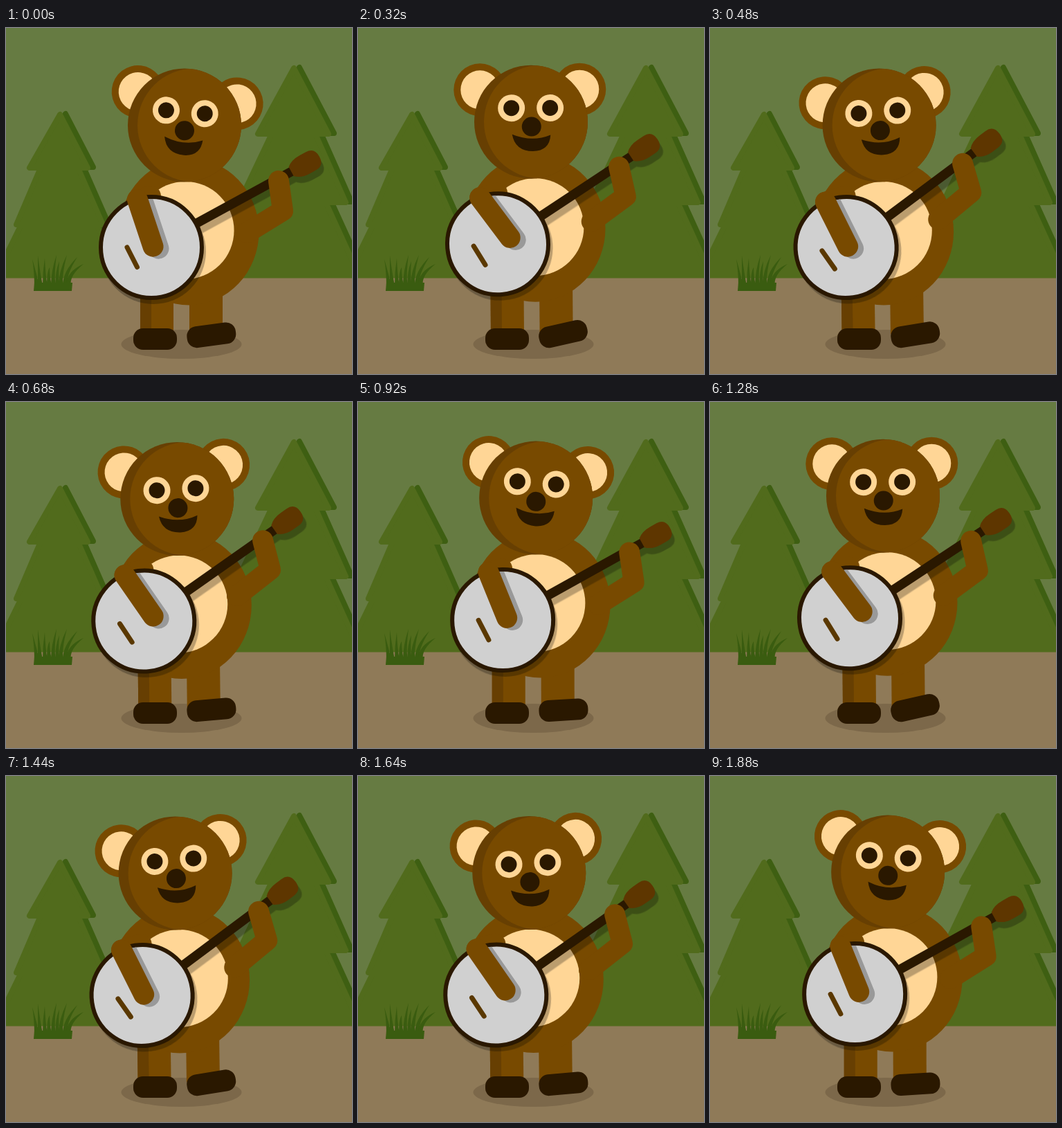
An HTML page that plays this animation: 500x500 px, repeating every 1920 ms.

```html
<!DOCTYPE html>
<html lang="en">
<head>
<meta charset="utf-8">
<title>Banjo bear</title>
<style>
  html, body { margin: 0; width: 100%; height: 100%; overflow: hidden; background: #667b42; }
  svg { display: block; width: 100vw; height: 100vh; }
  .fur { fill: #784a00; }
  .shade { fill: #673f02; }
  .cream { fill: #ffd696; }
  .dark { fill: #2a1800; }
  .limb { fill: none; stroke: #784a00; stroke-width: 30; stroke-linecap: round; stroke-linejoin: round; }
  .leg { fill: none; stroke: #784a00; stroke-width: 48; }
  .tree { fill: #516b1c; stroke: #516b1c; stroke-width: 8; stroke-linejoin: round; }
  .tree.back { fill: #3e5f12; stroke: #3e5f12; }
  .grass { fill: #3a5c10; }
  .cast { opacity: .27; }
</style>
</head>
<body>
<svg viewBox="0 0 500 500">
  <defs>
    <path id="pine1" d="M78 125 L34 202 H118Z M50 202 H104 L140 284 H15Z M22 284 H131 L172 370 H-20Z"/>
    <path id="pine2" d="M416 58 L364 153 H466Z M384 153 H447 L491 252 H337Z M352 252 H462 L516 370 H300Z"/>
    <clipPath id="skull"><circle r="82"/></clipPath>
    <rect id="neck" x="70" y="-6" width="166" height="13.500"/>
    <path id="peg" d="M230 -7 Q238 -14 252 -14 H262 Q276 -14 276 1 Q276 16 262 16 H252 Q238 16 230 8Z"/>
  </defs>

  <rect width="500" height="500" fill="#667b42"/>
  <use href="#pine1" class="tree back" x="8" y="-1"/>
  <use href="#pine1" class="tree"/>
  <use href="#pine2" class="tree back" x="8" y="-1"/>
  <use href="#pine2" class="tree"/>
  <rect y="361.500" width="500" height="139" fill="#8f7a58"/>
  <g class="grass" id="grass"></g>
  <ellipse cx="253.5" cy="457" rx="87" ry="21" fill="#7c684a"/>

  <path class="leg" id="legL"/>
  <path id="legShade" fill="none" stroke="#673f02" stroke-width="16"/>
  <path class="leg" id="legR"/>
  <rect class="dark" x="184" y="434" width="63" height="31" rx="14"/>
  <rect class="dark" id="shoe" x="-15.5" y="-15.5" width="71" height="31" rx="14"/>

  <ellipse class="fur" id="body" rx="101" ry="106"/>
  <circle class="cream" id="belly" r="70.5"/>
  <path class="limb" id="upperArm"/>

  <g id="head">
    <g id="ears">
      <circle class="fur" cx="-72" cy="-47" r="38"/><circle class="cream" cx="-72" cy="-47" r="28"/>
      <circle class="fur" cx="72" cy="-47" r="38"/><circle class="cream" cx="72" cy="-47" r="28"/>
    </g>
    <circle class="shade" r="82"/>
    <circle class="fur" cx="14" r="82" clip-path="url(#skull)"/>
    <g id="face">
      <circle class="cream" cx="-28" cy="-19" r="19.5"/><circle class="dark" cx="-28" cy="-19" r="11.5"/>
      <circle class="cream" cx="28" cy="-19" r="19.5"/><circle class="dark" cx="28" cy="-19" r="11.5"/>
      <circle class="dark" cx="1" cy="8" r="14"/>
      <path class="dark" d="M-27 19 Q2 31 28.500 20 Q27 43 3 43.500 Q-23 43 -27 19Z"/>
    </g>
  </g>

  <g id="banjo">
    <g class="cast">
      <g transform="translate(4 9) rotate(-28.600)"><use href="#neck"/><use href="#peg"/></g>
      <circle cx="3" cy="6" r="76"/>
    </g>
    <g transform="rotate(-28.600)">
      <use href="#neck" class="dark"/>
      <use href="#peg" fill="#5e3600"/>
    </g>
    <circle r="73" fill="#d0d0d0" stroke="#2a1800" stroke-width="6"/>
    <path d="M-35 0 L-20.500 28.500" stroke="#5a3800" stroke-width="7" stroke-linecap="round"/>
    <path class="limb" d="M184 -96 L190 -53 L138 -21"/>
  </g>
  <clipPath id="skin"><circle id="skinDisc" r="70"/></clipPath>
  <g clip-path="url(#skin)"><path class="limb" id="armCast" style="stroke:#999"/></g>
  <path class="limb" id="arm"/>
</svg>
<script>
  const $ = id => document.getElementById(id);
  const LOOP = 960, BEAT = 480, STEP = 40, TAU = 2 * Math.PI;

  // Grass blades: root x, tip x, tip y
  $('grass').innerHTML = [
    [42, 38, 334], [47, 46, 329], [54, 56, 333], [60, 63, 346], [66, 73, 328],
    [72, 77, 337], [77, 88, 328], [83, 103, 331], [88, 112, 341]
  ].map(([x, tx, ty]) =>
    `<path d="M${x - 1} 372 Q${x - 1} 352 ${tx} ${ty} Q${x + 3} 358 ${x + 6} 372Z"/>`
  ).join('') + '<path d="M40 380 L41 368 H96 L95 380Z"/>';

  const wave = (t, period, peak) => Math.cos(TAU * (t - peak) / period);

  // Cosine swing from 0 at time lo to 1 at time hi, with unequal rise and fall
  function swing(t, period, lo, hi) {
    const rise = (hi - lo + period) % period;
    const p = (t - lo + 2 * period) % period;
    const k = p < rise ? p / rise : 1 - (p - rise) / (period - rise);
    return (1 - Math.cos(Math.PI * k)) / 2;
  }

  const place = (id, x, y, turn = 0) =>
    $(id).setAttribute('transform', `translate(${x} ${y}) rotate(${turn})`);
  const line = (id, ...p) =>
    $(id).setAttribute('d', `M${p[0]} ${p[1]} L${p[2]} ${p[3]}`);

  function draw(t) {
    const x = -6.7 + 7.1 * wave(t, LOOP, 52);
    const y = 3.3 + 3.7 * wave(t, BEAT, 95);
    const tilt = 0.4 + 7.2 * wave(t, LOOP, 66);

    place('body', 264.5 + x, 290 + y);
    place('belly', 259 + x + 2.4 + 2.8 * wave(t, LOOP, 390), 288 + y);

    const earY = -1 + 15 * swing(t, BEAT, 375, 40);
    const faceY = -3.4 + 10.4 * swing(t, BEAT, 410, 120);
    place('head', 258 + x, 136 + y);
    place('ears', -1.5, earY - y, tilt);
    place('face', -0.3, faceY, tilt * 0.72);

    const lx = 218 + x * 0.25, rx = 289 + x * 0.3;
    line('legL', lx + x * 0.1, 340 + y, lx, 445);
    line('legShade', lx - 16 + x * 0.1, 340 + y, lx - 16, 445);
    line('legR', rx + x * 0.1, 340 + y, rx, 442);
    place('shoe', 277, 446.5, -3 - 12 * swing(t, LOOP, 900, 80));

    const turn = x * 0.61, a = turn * Math.PI / 180;
    const cx = 210 + x, cy = 312.5 + y;
    place('banjo', cx, cy, turn);

    // Forearm runs from the turning elbow to the strumming hand
    const ex = cx - 20 * Math.cos(a) + 69 * Math.sin(a);
    const ey = cy - 20 * Math.sin(a) - 69 * Math.cos(a);
    const strum = 11.7 + 8.8 * wave(t, BEAT, 287);
    const hx = cx + strum - 2, hy = cy - strum * 0.52 + 1;
    line('upperArm', cx - 1, cy - 74, ex, ey);
    line('arm', ex, ey, hx, hy);
    line('armCast', ex + 8, ey + 3, hx + 8, hy + 3);
    $('skinDisc').setAttribute('cx', cx);
    $('skinDisc').setAttribute('cy', cy);
  }

  const start = performance.now();
  function tick() {
    const t = Math.max(0, performance.now() - start) % LOOP;
    draw(Math.floor(t / STEP) * STEP);
    requestAnimationFrame(tick);
  }
  tick();
</script>
</body>
</html>
```
